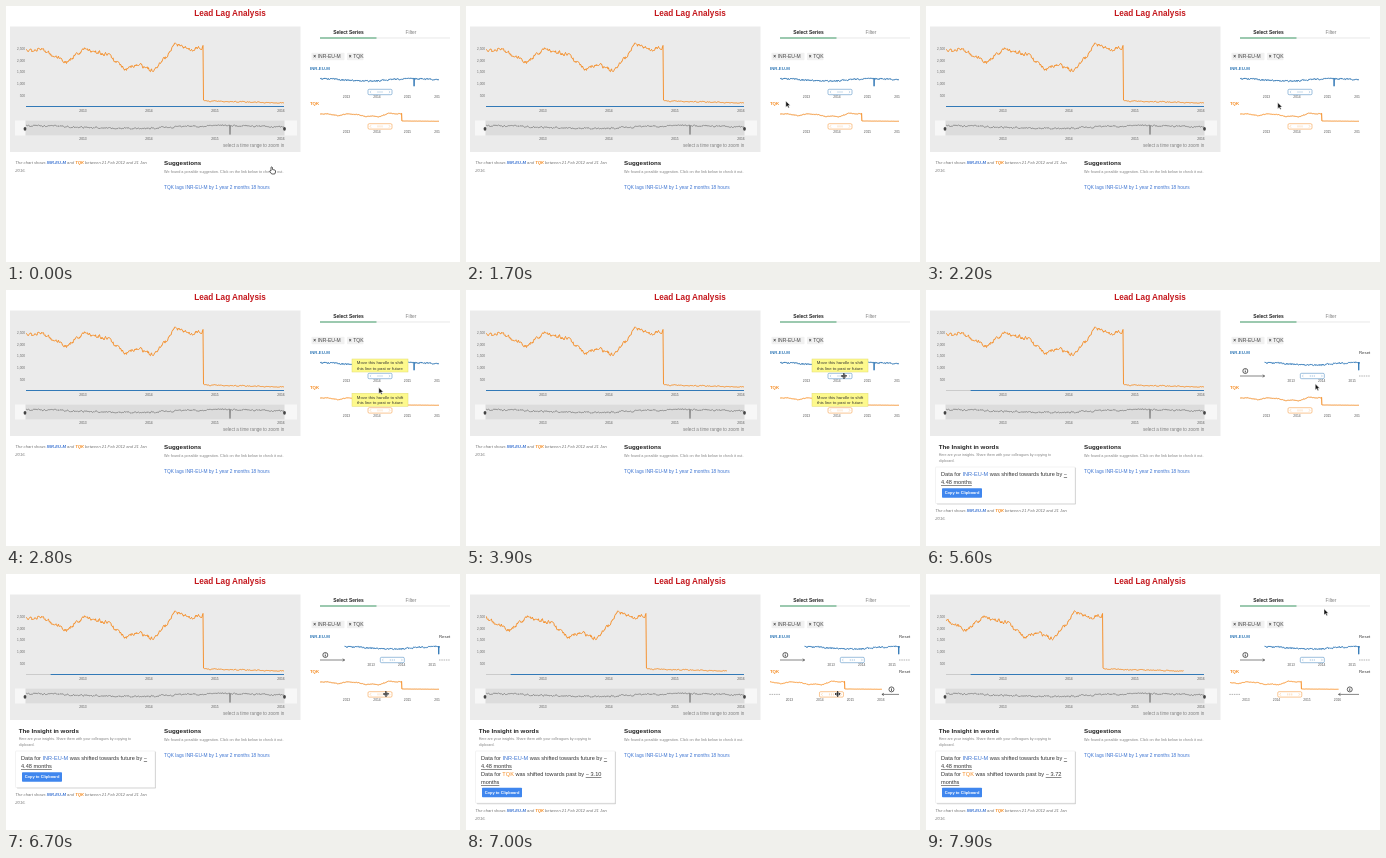
An HTML page that plays this animation: 454x256 px, repeating every 8 s.

```html
<!DOCTYPE html>
<html lang="en">
<head>
<meta charset="utf-8">
<title>Lead Lag Analysis</title>
<style>
html, body { margin: 0; width: 100%; height: 100%; overflow: hidden; background: #fff; }
svg { display: block; width: 454px; height: 256px; font-family: "Liberation Sans", Arial, sans-serif; }
</style>
</head>
<body>
<svg id="stage" viewBox="0 0 454 256" xml:space="preserve"></svg>
<script>
const BLUE = '#3279b7', ORANGE = '#f58a1f', LINK = '#3b73d1', GREY = '#808080', DARK = '#333';
const SERIES = 'INR-EU-M', STOCK = 'TQK';
const LOOP = 8000, STEP = 100, PX_PER_MONTH = 5.5;
const MAIN = { left: 20, right: 278 }, MINI = { left: 314, right: 433 };
const stage = document.getElementById('stage');

function add(parent, tag, attrs = {}, content) {
  const node = document.createElementNS('http://www.w3.org/2000/svg', tag);
  for (const key in attrs) node.setAttribute(key, attrs[key]);
  if (content !== undefined) node.textContent = content;
  parent.appendChild(node);
  return node;
}
const group = (parent, attrs) => add(parent, 'g', attrs);
const rect = (parent, x, y, width, height, fill, more) =>
  add(parent, 'rect', { x, y, width, height, fill, ...more });
const path = (parent, d, stroke, width = 0.8, more) =>
  add(parent, 'path', { d, stroke, 'stroke-width': width, fill: 'none', ...more });
const label = (parent, x, y, size, content, fill = '#222', more) =>
  add(parent, 'text', { x, y, 'font-size': size, fill, ...more }, content);
const moveTo = (node, x, y) => node.setAttribute('transform', `translate(${x} ${y})`);
const BOLD = { 'font-weight': 'bold' }, MIDDLE = { 'text-anchor': 'middle' };
const UNDERLINE = { 'text-decoration': 'underline' };

// A line of text from [content, color, extra attributes] pieces
function richText(parent, x, y, size, pieces) {
  const text = label(parent, x, y, size, '');
  return pieces.map(([content, fill = DARK, extra]) => add(text, 'tspan', { fill, ...extra }, content));
}

function clipped(id, x, y, width, height) {
  rect(add(stage, 'clipPath', { id }), x, y, width, height, '#000');
  return group(group(stage, { 'clip-path': `url(#${id})` }));
}

function yearLabels(parent, first, gap, y) {
  for (let i = 0; i < 4; i++) label(parent, first + i * gap, y, 3.3, 2013 + i, '#555', MIDDLE);
}

// Series: a smooth trend plus seeded, slowly decaying noise
function roughSeries(trend, jitter, seed) {
  const points = [];
  let drift = 0;
  for (let x = MAIN.left; x <= MAIN.right; x += 0.5) {
    seed = (seed * 16807) % 2147483647;
    drift = drift * 0.6 + (seed / 2147483647 - 0.5) * jitter(x);
    points.push([x, trend(x) + drift]);
  }
  return points;
}
const toPath = (points, fx = x => x, fy = y => y) =>
  'M' + points.map(([x, y]) => `${fx(x).toFixed(2)} ${fy(y).toFixed(2)}`).join('L');
const miniX = x => MINI.left + (x - MAIN.left) * (MINI.right - MINI.left) / (MAIN.right - MAIN.left);

const CLIFF = 197.5, DIP = 224;
const turns = [[20, 45], [36, 43], [60, 56], [78, 43], [102, 49], [119, 63], [132, 58],
  [147, 65], [161, 50], [169, 38], [185, 44], [198, 41]];
function stockTrend(x) {
  if (x >= CLIFF) return 95 + (x - CLIFF) * 0.025;
  const i = turns.findIndex(([turnX]) => turnX > x);
  const [[x0, y0], [x1, y1]] = [turns[i - 1], turns[i]];
  return y0 + (y1 - y0) * (x - x0) / (x1 - x0);
}
const rateTrend = x => x === DIP ? 129.5 : 121 - 1.3 * Math.cos((x - MAIN.left) / 32);
const stockPoints = roughSeries(stockTrend, x => x < CLIFF ? 3 : 0.8, 71);
const ratePoints = roughSeries(rateTrend, () => 1.2, 19);

// Heading and main chart
label(stage, 224, 9.5, 8.2, 'Lead Lag Analysis', '#c4161c', { ...BOLD, ...MIDDLE });
rect(stage, 4, 20.5, 290.5, 125.5, '#ebebeb');
for (let i = 1; i <= 5; i++)
  label(stage, 19, 102.4 - i * 11.7, 3.2, (i * 500).toLocaleString('en-US'), '#666', { 'text-anchor': 'end' });
rect(stage, 9, 114.5, 282, 15, '#f7f7f7');
rect(stage, 19.5, 114.5, 259, 15, '#dcdcdc');
path(stage, toPath(ratePoints), '#707070', 0.7);
for (const x of [19, 278.5]) add(stage, 'ellipse', { cx: x, cy: 122.8, rx: 1.4, ry: 1.9, fill: '#444' });
for (const y of [105.5, 134.3]) yearLabels(stage, 77, 66, y);
label(stage, 217, 140.5, 4.6, 'select a time range to zoom in', GREY);
path(stage, 'M20 100.5H278', '#b5b5b5', 0.6);
const mainRate = clipped('rateArea', 20, 95, 258, 12);
path(mainRate, 'M20 100.5H278', BLUE, 1);
const mainStock = clipped('stockArea', 20, 24, 258, 76);
path(mainStock, toPath(stockPoints), ORANGE, 0.9);

// Series panel
label(stage, 342.5, 28.2, 4.9, 'Select Series', '#222', { ...BOLD, ...MIDDLE });
label(stage, 405, 28.2, 4.9, 'Filter', GREY, MIDDLE);
path(stage, 'M314 32H444', '#dedede', 0.7);
path(stage, 'M314 32H370.5', '#45a06c', 1.2);
for (const [x, width, name] of [[305.5, 33, SERIES], [341, 16.5, STOCK]]) {
  rect(stage, x, 46.8, width, 7.4, '#f1f1f1', { rx: 0.8 });
  label(stage, x + 1.8, 52.4, 4.8, '×', DARK, BOLD);
  label(stage, x + 6.2, 52.4, 5, name, '#444');
}

function miniChart(id, name, color, top, line) {
  label(stage, 304, top, 4.3, name, color, BOLD);
  const axisY = top + 21.8;
  const plot = clipped(id, 304, top + 1, 130, 31);
  path(plot, line, color, 1);
  yearLabels(plot, 340.5, 30.5, top + 28.2);

  const extras = group(stage);
  label(extras, 433, top, 4.3, 'Reset', DARK);
  const arrow = path(extras, '', DARK, 0.6);
  const overflow = path(extras, '', GREY, 0.6, { 'stroke-dasharray': '1.5 .8' });
  const info = group(extras);
  add(info, 'circle', { r: 2.5, fill: '#fff', stroke: '#222', 'stroke-width': 0.7 });
  path(info, 'M0 -1.5V-.8M0 -.3V1.5', '#222', 0.8);

  const handle = group(stage);
  rect(handle, -12, -2.7, 24, 5.4, '#fff', { rx: 1.2, stroke: color, 'stroke-width': 0.6, 'stroke-opacity': 0.8 });
  path(handle, 'M-9 -1.2L-10 0L-9 1.2M9 -1.2L10 0L9 1.2M-2 -1V1M0 -1V1M2 -1V1', color, 0.4, { opacity: 0.7 });

  return shift => {
    moveTo(plot, shift, 0);
    moveTo(handle, 374 + shift / 2, axisY);
    extras.setAttribute('visibility', shift ? 'visible' : 'hidden');
    const side = Math.sign(shift), from = side > 0 ? MINI.left : MINI.right, to = from + shift;
    const back = to - 2 * side;
    arrow.setAttribute('d', `M${from} ${axisY}H${to}M${back} ${axisY - 1.2}L${to} ${axisY}L${back} ${axisY + 1.2}`);
    overflow.setAttribute('d', `M${side > 0 ? MINI.right : MINI.left} ${axisY}h${11 * side}`);
    moveTo(info, from - 7 * (side > 0) + 1 * (side < 0) + shift / 2, axisY - 5);
  };
}
const shiftRate = miniChart('miniRate', SERIES, BLUE, 64.2,
  toPath(ratePoints, miniX, y => 73.8 + (y - 121) * 0.85));
const shiftStock = miniChart('miniStock', STOCK, ORANGE, 98.6,
  toPath(stockPoints, miniX, y => 107 + (y - 37) * 0.138));

// Text below the chart
label(stage, 158, 158.6, 6.2, 'Suggestions', '#222', BOLD);
label(stage, 158, 167.3, 3.82, 'We found a possible suggestion. Click on the link below to check it out.', GREY);
label(stage, 158, 182.7, 4.8, `${STOCK} lags ${SERIES} by 1 year 2 months 18 hours`, LINK);

const insight = group(stage);
label(insight, 12.7, 158.6, 6.2, 'The Insight in words', '#222', BOLD);
label(insight, 12.7, 166.2, 3.64, 'Here are your insights. Share them with your colleagues by copying to', GREY);
label(insight, 12.7, 171.6, 3.64, 'clipboard.', GREY);
const shadow = rect(insight, 10.8, 177.6, 139.2, 37, '#d4d4d4', { rx: 0.8 });
const card = rect(insight, 9.5, 177, 139.5, 36.5, '#fff', { rx: 0.8, stroke: '#e6e6e6', 'stroke-width': 0.5 });

// Two wrapped lines; returns the underlined end of the first and start of the second
function insightLines(parent, y, name, color, direction) {
  const first = richText(parent, 15, y, 5.6,
    [['Data for '], [name, color], [` was shifted towards ${direction} by `], ['', DARK, UNDERLINE]]);
  const second = richText(parent, 15, y + 8, 5.6, [['', DARK, UNDERLINE]]);
  return [first[3], second[0]];
}
const rateEnds = insightLines(insight, 186, SERIES, LINK, 'future');
const stockInsight = group(insight);
const stockEnds = insightLines(stockInsight, 202, STOCK, ORANGE, 'past');
const button = group(insight);
rect(button, 16, 198.2, 40, 9.5, '#3f86ee', { rx: 0.8 });
label(button, 36, 204.4, 4, 'Copy to Clipboard', '#fff', { ...BOLD, ...MIDDLE });

const summary = group(stage, { 'font-style': 'italic' });
richText(summary, 9.3, 158.2, 4.15, [['The chart shows ', '#777'], [SERIES, LINK, BOLD], [' and ', '#777'],
  [STOCK, ORANGE, BOLD], [' between 21 Feb 2012 and 21 Jan', '#777']]);
label(summary, 9.3, 165.8, 4.15, '2016.', '#777');

// Tooltips and pointer
const tips = group(stage);
for (const y of [69, 103.3]) {
  rect(tips, 346, y, 56, 13, '#fdf98c', { stroke: '#e2dc70', 'stroke-width': 0.5 });
  label(tips, 374, y + 5.4, 4.3, 'Move this handle to shift', DARK, MIDDLE);
  label(tips, 374, y + 10.8, 4.3, 'this line to past or future', DARK, MIDDLE);
}
const pointer = group(stage);
const round = { 'stroke-linejoin': 'round' };
const shapes = {
  arrow: path(pointer, 'M0 0V6.2L1.5 4.9L2.5 7L3.6 6.5L2.6 4.5H4.5Z', '#fff', 0.5, { ...round, fill: '#111' }),
  hand: path(pointer, 'M-1 -2.3Q0 -3 .5 -2V0L3 .6Q3.8 1 3.5 2.5L2.8 4.5H-.3L-2.3 1.8Q-2.3 .7 -1 1.4Z', '#222', 0.7, { ...round, fill: '#fff' }),
  move: group(pointer)
};
for (let angle = 0; angle < 360; angle += 90)
  path(shapes.move, 'M0 0H2.4M1.6 -.9L2.5 0L1.6 .9', '#111', 0.9, { transform: `rotate(${angle})` });

const progress = (t, from, to) => Math.min(1, Math.max(0, (t - from) / (to - from)));
const easeOut = k => 1 - (1 - k) ** 1.96;

// Each move eases to a point and sets the pointer's shape on arrival
const moves = [
  { from: 200, to: 1700, x: 319.8, y: 95, kind: 'arrow' },
  { from: 1900, to: 2700, x: 372.8, y: 97.5, kind: 'arrow' },
  { from: 3600, to: 3900, x: 378, y: 86, kind: 'move' },
  { from: 4500, to: 5100, x: 392, y: 86, kind: 'move' },
  { from: 5500, to: 6300, x: 380, y: 120, kind: 'move' },
  { from: 6700, to: 7200, x: 370, y: 120, kind: 'move' },
  { from: 7300, to: 7900, x: 398, y: 34.8, kind: 'arrow' }];

function pointerAt(t) {
  let x = 266, y = 163.5, kind = 'hand';
  for (const step of moves.filter(m => t > m.from)) {
    const k = easeOut(progress(t, step.from, step.to));
    x += (step.x - x) * k;
    y += (step.y - y) * k;
    if (k > 0.8) kind = step.kind;
    else if (kind !== step.kind || Math.abs(step.y - y) > 2) kind = 'arrow';
  }
  return { x, y, kind };
}

function render(t) {
  const rate = 4.48 * easeOut(progress(t, 4500, 5100));
  const stock = 3.72 * easeOut(progress(t, 6700, 7200));
  moveTo(mainRate, rate * PX_PER_MONTH, 0);
  moveTo(mainStock, -stock * PX_PER_MONTH, 0);
  shiftRate(rate * PX_PER_MONTH);
  shiftStock(-stock * PX_PER_MONTH);

  insight.setAttribute('display', rate ? 'inline' : 'none');
  stockInsight.setAttribute('display', stock ? 'inline' : 'none');
  rateEnds[0].textContent = '~';
  rateEnds[1].textContent = `${rate.toFixed(2)} months`;
  stockEnds[0].textContent = `~ ${stock.toFixed(2)}`;
  stockEnds[1].textContent = 'months';
  const extra = stock ? 15.6 : 0;
  shadow.setAttribute('height', 37 + extra);
  card.setAttribute('height', 36.5 + extra);
  moveTo(button, 0, extra);
  moveTo(summary, 0, rate ? 64.2 + extra : 0);

  tips.setAttribute('opacity', t < 2500 ? 0 : 1 - progress(t, 4000, 4200));
  const { x, y, kind } = pointerAt(t);
  moveTo(pointer, x, y);
  for (const name in shapes) shapes[name].setAttribute('visibility', name === kind ? 'visible' : 'hidden');
}

let start;
function tick(now) {
  start ??= now;
  render(Math.floor(((now - start) % LOOP) / STEP) * STEP);
  requestAnimationFrame(tick);
}
render(0);
requestAnimationFrame(tick);
</script>
</body>
</html>
```
